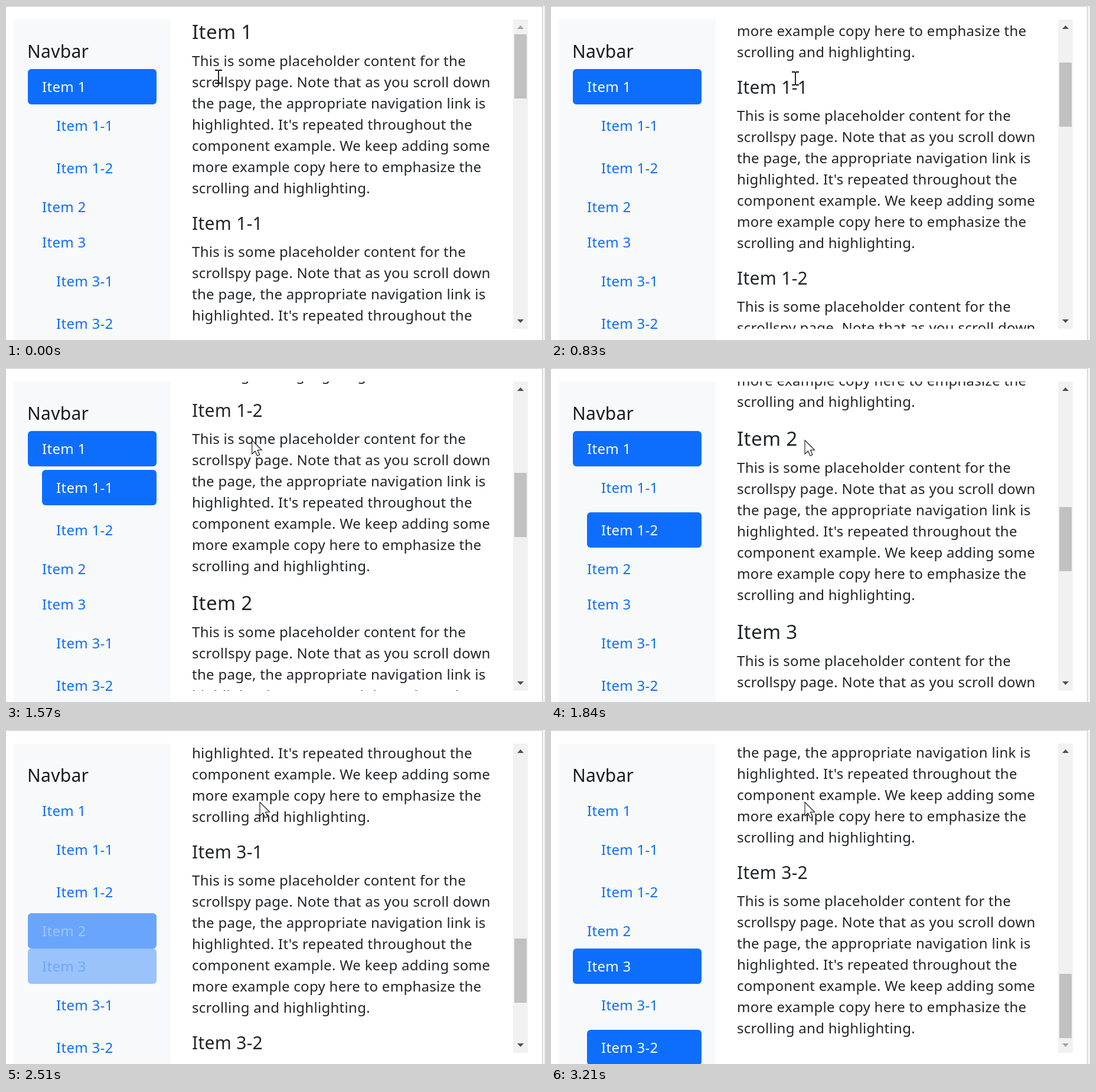
An HTML page for the animation above (3.81 s loop, 913 px wide and 567 px high).

```html
<!DOCTYPE html>
<html lang="en">
<head>
<meta charset="utf-8">
<title>Scrollspy</title>
<style>
  html, body { margin: 0; width: 100%; height: 100%; overflow: hidden; background: #fff; }
  body { position: relative; font: 24px/36px "Noto Sans", "Open Sans", sans-serif; letter-spacing: .012em; color: #212529; white-space: nowrap; }
  body > *, #nav > * { position: absolute; box-sizing: border-box; }
  #top { left: 0; top: 0; width: 100%; height: 1px; background: #c3c3c3; }
  #edge { left: 908px; top: 0; width: 5px; height: 100%; background: #f3f3f3; border-left: 1px solid #c6c6c6; }
  #nav { left: 13px; top: 23px; width: 266px; height: 544px; background: #f8f9fa; overflow: hidden; }
  #brand { left: 23px; top: 36px; font-size: 30px; color: #191a1f; }
  .link { right: 24px; height: 60px; padding: 12px 24px; border-radius: 6px; }
  #view { left: 315px; top: 23px; width: 544px; height: 525px; overflow: hidden; }
  h4, h5 { margin: 0 0 12px; font-weight: 400; }
  h4 { font-size: 33.3px; line-height: 40px; }
  h5 { font-size: 30px; line-height: 36px; }
  p { margin: 0 0 24px; }
  #bar { left: 859px; top: 23px; width: 25px; height: 525px; background: #f1f1f1; }
  #thumb { left: 861px; top: 48px; width: 21px; height: 109px; background: #c1c1c1; }
  svg { left: 0; top: 0; width: 913px; height: 567px; }
</style>
</head>
<body>
<div id="top"></div>
<div id="edge"></div>
<div id="nav"><div id="brand">Navbar</div></div>
<div id="view"><div id="content"></div></div>
<div id="bar"></div>
<div id="thumb"></div>
<svg viewBox="0 0 913 567">
  <path id="up" d="M866 39l5.500-6 5.500 6z"/>
  <path id="down" d="M866 532l5.500 6 5.500-6z"/>
  <path id="beam" d="M-6-11h4.500l1.500 1 1.500-1h4.500M0-10V10M-6 11h4.500l1.500-1 1.500 1h4.500" fill="none" stroke="#111" stroke-width="1.800"/>
  <path id="arrow" d="M0 .5V24l5.300-5 3.700 8 4-1.700-3.500-8h7z" fill="#fff" stroke="#111" stroke-width="1.100"/>
</svg>
<script>
const LOOP = 3810, FADE = 150;
const $ = id => document.getElementById(id);

// name, top inside the navbar, active from, active until
const items = [
  ['Item 1', 84, -FADE, 2010],
  ['Item 1-1', 150, 1134, 1590],
  ['Item 1-2', 222, 1590, 2010],
  ['Item 2', 288, 2010, 2445],
  ['Item 3', 348, 2445, LOOP],
  ['Item 3-1', 414, 2765, 3040],
  ['Item 3-2', 486, 3040, LOOP]
];
// start, end, change in value
const wheel = [
  [340, 570, 150], [700, 933, 150], [1075, 1336, 300], [1520, 1830, 300],
  [1920, 2160, 300], [2320, 2560, 300], [2600, 2830, 150], [2850, 2983, 105]
];
const pointerX = [[60, 480, 54], [1100, 1235, 2], [1540, 1770, 14]];
const pointerY = [[60, 480, 3], [1000, 1100, -1]];
// first redraw, last redraw, number of redraws
const bursts = [[70, 960, 14], [1100, 1370, 5], [1570, 1840, 5], [1970, 2170, 4], [2370, 3210, 13]];

const copy = `This is some placeholder content for the
scrollspy page. Note that as you scroll down
the page, the appropriate navigation link is
highlighted. It's repeated throughout the
component example. We keep adding some
more example copy here to emphasize the
scrolling and highlighting.`.replace(/\n/g, '<br>');

const links = items.map(([name, top]) => {
  const sub = name.includes('-'), tag = sub ? 'h5' : 'h4';
  $('content').insertAdjacentHTML('beforeend', `<${tag}>${name}</${tag}><p>${copy}</p>`);
  const link = document.createElement('div');
  link.className = 'link';
  link.textContent = name;
  link.style.top = top + 'px';
  link.style.left = (sub ? 48 : 24) + 'px';
  $('nav').append(link);
  return link;
});

function ease(t, start, end) {
  const x = Math.min(1, Math.max(0, (t - start) / (end - start)));
  return x * x * (3 - 2 * x);
}
const total = (moves, t) => moves.reduce((sum, [a, b, d]) => sum + d * ease(t, a, b), 0);

function snap(t) {
  let shown = 0;
  for (const [first, last, count] of bursts) {
    if (t < first) break;
    const step = (last - first) / (count - 1);
    shown = first + step * Math.min(count - 1, Math.floor((t - first) / step + 1e-6));
  }
  return shown;
}

function draw(t) {
  const scroll = Math.round(total(wheel, t));
  $('content').style.transform = `translateY(${-scroll}px)`;
  $('thumb').style.transform = `translateY(${Math.round(scroll * 366 / 1755)}px)`;
  $('up').setAttribute('fill', scroll > 0 ? '#505050' : '#a3a3a3');
  $('down').setAttribute('fill', scroll < 1755 ? '#505050' : '#a3a3a3');

  items.forEach(([, , on, off], i) => {
    const p = ease(t, on, on + FADE) - ease(t, off, off + FADE);
    links[i].style.background = `rgba(13,110,253,${p})`;
    links[i].style.color = `rgb(${13 + 242 * p},${110 + 145 * p},${253 + 2 * p})`;
  });

  const place = `translate(${360 + total(pointerX, t)} ${120 + total(pointerY, t)})`;
  const typing = t < 1090;
  for (const [id, shown] of [['beam', typing], ['arrow', !typing]]) {
    $(id).setAttribute('transform', place);
    $(id).style.display = shown ? '' : 'none';
  }
}

const began = performance.now();
function tick() {
  draw(snap((performance.now() - began) % LOOP));
  requestAnimationFrame(tick);
}
tick();
</script>
</body>
</html>
```
